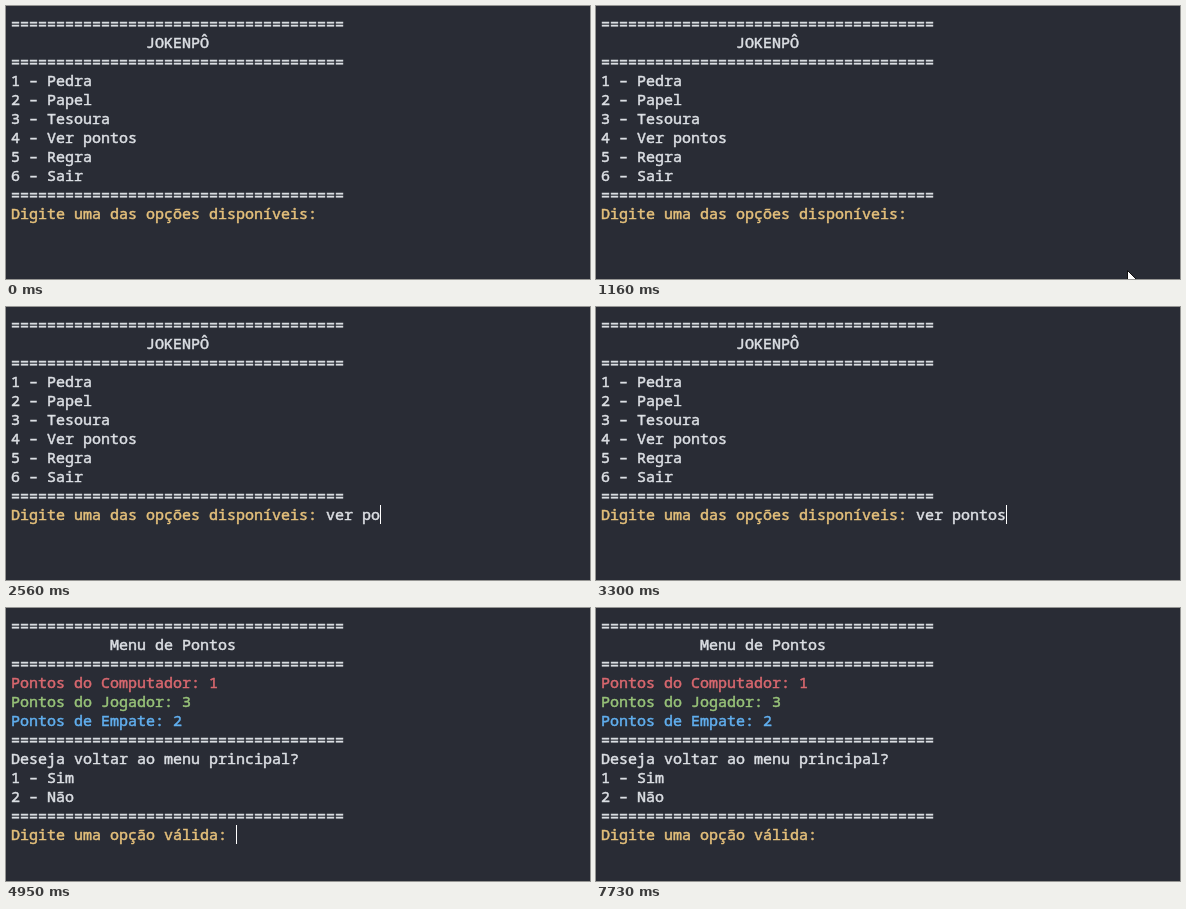
An HTML page with a canvas that plays this animation: 584 px wide and 273 px high, repeating every 8 s.

```html
<!DOCTYPE html>
<html lang="pt-BR">
<head>
<meta charset="utf-8">
<style>
  html, body { margin: 0; height: 100%; overflow: hidden; background: #292c35; }
  canvas { display: block; }
</style>
</head>
<body>
<canvas id="stage" width="584" height="273"></canvas>
<script>
const ctx = document.getElementById('stage').getContext('2d');
const LOOP = 8000, LEFT = 5, TOP = 8, CHAR = 9, LINE = 19;
const WHITE = '#dcdfe4', YELLOW = '#e5c07b', RED = '#d9686f', GREEN = '#98c379', BLUE = '#61afef';
const RULE = '='.repeat(37);

const mainMenu = [
  [RULE], [' '.repeat(15) + 'JOKENPÔ'], [RULE],
  ['1 – Pedra'], ['2 – Papel'], ['3 – Tesoura'],
  ['4 – Ver pontos'], ['5 – Regra'], ['6 – Sair'],
  [RULE], ['Digite uma das opções disponíveis: ', YELLOW]
];
const scoreMenu = [
  [RULE], [' '.repeat(11) + 'Menu de Pontos'], [RULE],
  ['Pontos do Computador: 1', RED], ['Pontos do Jogador: 3', GREEN], ['Pontos de Empate: 2', BLUE],
  [RULE], ['Deseja voltar ao menu principal?'], ['1 – Sim'], ['2 – Não'],
  [RULE], ['Digite uma opção válida: ', YELLOW]
];

const answer = 'ver pontos';
const keyTimes = [1420, 1690, 1760, 2230, 2360, 2560, 2840, 2970, 3100, 3300];
const submitTime = 3830;
const caretToggles = [500, 1160, 1420, 4420, 4950, 5550, 6080, 6610, 7200, 7730];

const passed = (times, t) => times.filter(time => time <= t).length;

// A thin outline gives the regular face a semi-bold weight.
function write(text, col, row, color = WHITE) {
  const x = LEFT + col * CHAR, y = TOP + row * LINE + (text === RULE ? 14.5 : 15);
  ctx.fillStyle = ctx.strokeStyle = color;
  ctx.lineWidth = 0.5;
  ctx.fillText(text, x, y);
  ctx.strokeText(text, x, y);
}

function drawTerminal(lines, typed, caretOn) {
  lines.forEach(([text, color], row) => write(text, 0, row, color));
  const row = lines.length - 1, col = lines[row][0].length;
  write(typed, col, row);
  if (caretOn) {
    ctx.fillStyle = '#fff';
    ctx.fillRect(LEFT + (col + typed.length) * CHAR, TOP + row * LINE, 1, LINE);
  }
}

function drawPointer(x, y) {
  ctx.save();
  ctx.translate(x, y);
  ctx.fillStyle = '#fff';
  ctx.strokeStyle = '#111';
  ctx.lineWidth = 1;
  const arrow = new Path2D('M.5 .5V15L4 11.5L6.5 17L8.5 16L6 11H11Z');
  ctx.fill(arrow);
  ctx.stroke(arrow);
  ctx.restore();
}

function drawMouse(t) {
  const clicking = t >= 500 && t < 1420;
  if (!clicking && !(t >= 1960 && t < 2230)) return;
  const move = clicking ? Math.min(1, Math.max(0, (t - 700) / 200)) : 1;
  const x = 527 + 4 * move, y = 268 - 4 * move;
  if (move < 1) {
    ctx.globalAlpha = 1 - move;
    ctx.fillStyle = '#8e8f1d';
    ctx.beginPath();
    ctx.arc(x, y + 1, 12, 0, Math.PI * 2);
    ctx.fill();
    ctx.globalAlpha = 1;
  }
  drawPointer(x, y);
}

function draw(now) {
  const t = now % LOOP;
  ctx.fillStyle = '#292c35';
  ctx.fillRect(0, 0, 584, 273);
  ctx.font = '500 15px "Noto Sans Mono", monospace';
  const caretOn = passed(caretToggles, t) % 2 === 1;
  if (t < submitTime) drawTerminal(mainMenu, answer.slice(0, passed(keyTimes, t)), caretOn);
  else drawTerminal(scoreMenu, '', caretOn);
  drawMouse(t);
  requestAnimationFrame(draw);
}
requestAnimationFrame(draw);
</script>
</body>
</html>
```
